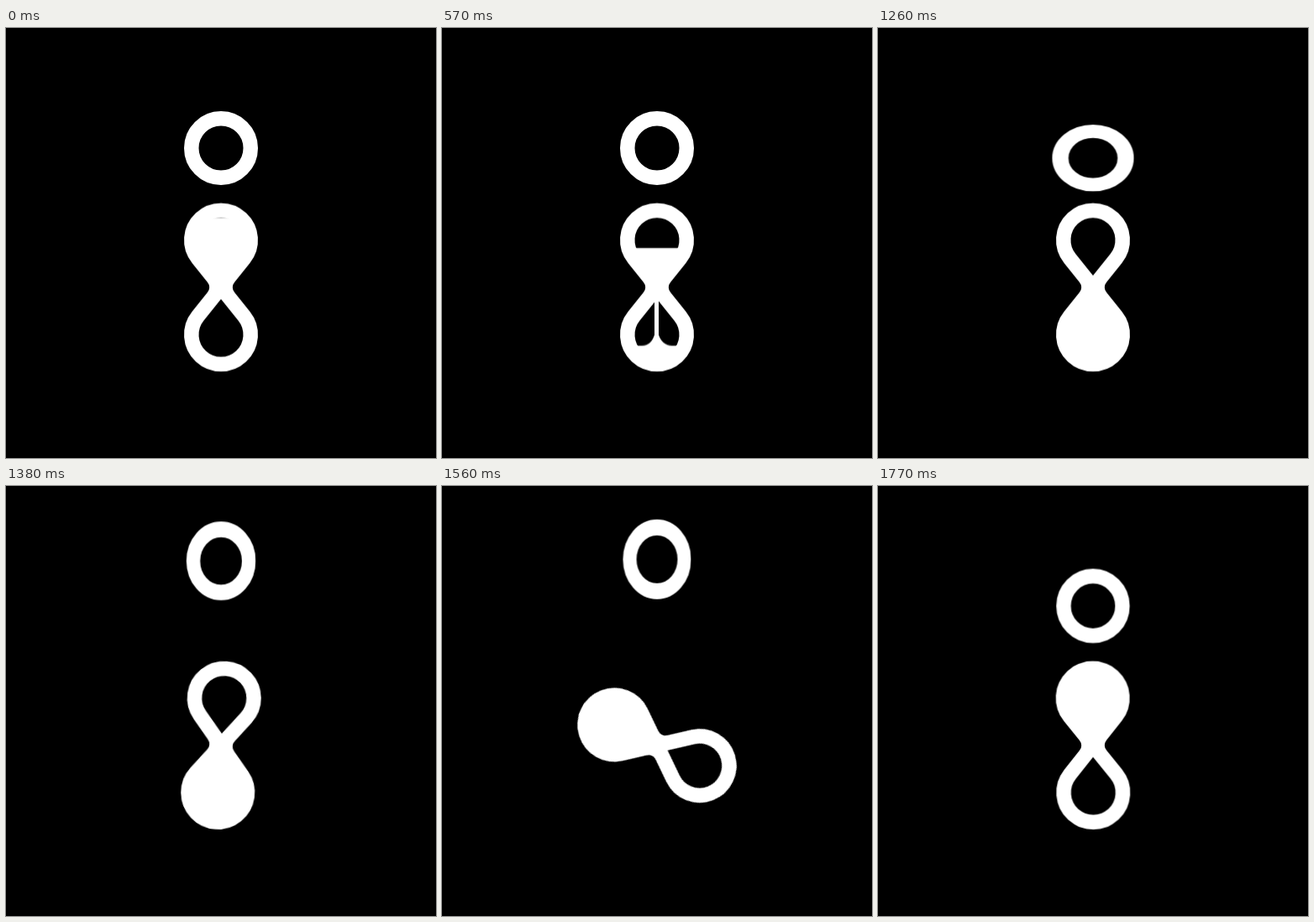
An HTML page without scripts that plays this animation: 512x512 px, repeating every 1.8 s.

```html
<!DOCTYPE html>
<html lang="en">
<head>
<meta charset="utf-8">
<title>Hourglass</title>
<style>
  html, body { margin: 0; width: 100%; height: 100%; overflow: hidden; background: #000; }
  svg { display: block; width: 100vw; height: 100vh; }
  .line { fill: none; stroke: #fff; stroke-width: 17.5; }
  .sand, .neck { fill: #fff; }

  .ring, .glass, .top, .pile, .stream { animation: 1800ms linear infinite; }
  .ring { animation-name: hop; }
  .squash { animation: squash 1800ms ease-in-out infinite; }
  .glass { animation-name: flip; }
  .top { animation-name: drain; }
  .pile { animation-name: rise; }
  .stream { animation-name: pour; }

  /* the upper level sinks at a steady rate */
  @keyframes drain {
    0% { transform: translateY(0); }
    61.11%, 100% { transform: translateY(69.7px); }
  }
  @keyframes pour {
    0% { transform: translateY(-75px); }
    8.33%, 100% { transform: translateY(0); }
  }
  @keyframes rise {
    0%, 10% { transform: translateY(98px); }
    16.67% { transform: translateY(88px); }
    30% { transform: translateY(71.5px); }
    48.33% { transform: translateY(50.25px); }
    60% { transform: translateY(35px); }
    66.67%, 100% { transform: translateY(10px); }
  }
  /* half a turn, then the loop starts over with a full top */
  @keyframes flip {
    0%, 71.667% { transform: rotate(0deg); animation-timing-function: cubic-bezier(.8, 0, .2, 1); }
    100% { transform: rotate(180deg); }
  }
  @keyframes hop {
    0%, 60.5% { transform: translate(256px, 143px); animation-timing-function: ease-in-out; }
    71% { transform: translate(256px, 155px); animation-timing-function: cubic-bezier(.55, 0, .3, 1); }
    80.83% { transform: translate(256px, 71.5px); animation-timing-function: cubic-bezier(.4, 0, .8, .6); }
    83.33% { transform: translate(256px, 76px); }
    85% { transform: translate(256px, 80.5px); }
    86.67% { transform: translate(256px, 87px); }
    88.33% { transform: translate(256px, 96px); }
    90% { transform: translate(256px, 109px); }
    91.67% { transform: translate(256px, 128.5px); animation-timing-function: cubic-bezier(.15, .6, .4, 1); }
    100% { transform: translate(256px, 143px); }
  }
  @keyframes squash {
    0%, 60.5% { transform: scale(1, 1); }
    71% { transform: scale(1.105, .9); }
    78% { transform: scale(.925, 1.078); }
    91.67% { transform: scale(.92, 1.08); }
    100% { transform: scale(1, 1); }
  }
</style>
</head>
<body>
<svg viewBox="0 0 512 512">
  <defs>
    <clipPath id="upper">
      <path d="M0 0L27.47 -34.16A35.25 35.25 0 1 0 -27.47 -34.16Z"/>
    </clipPath>
    <clipPath id="lower">
      <path d="M0 0L27.47 34.16A35.25 35.25 0 1 1 -27.47 34.16Z"/>
    </clipPath>
  </defs>

  <g class="ring">
    <g class="squash"><circle class="line" r="35.25"/></g>
  </g>

  <g transform="translate(256 308.75)">
    <g class="glass">
      <g class="sand" clip-path="url(#upper)">
        <rect class="top" x="-45" y="-82.75" width="90" height="90"/>
      </g>
      <g class="sand" clip-path="url(#lower)">
        <rect class="stream" x="-3" y="8" width="5" height="80"/>
        <path class="pile" d="M-45 0H-18C-10 0 -5 -6 -3 -13H2C4 -6 10 0 18 0H45V90H-45Z"/>
      </g>
      <path class="line" d="M-27.47 -34.16L27.47 34.16A35.25 35.25 0 1 1 -27.47 34.16L27.47 -34.16A35.25 35.25 0 1 0 -27.47 -34.16Z"/>
      <path class="neck" d="M-15.8 -5.64A9 9 0 0 1 -15.8 5.64H15.8A9 9 0 0 1 15.8 -5.64Z"/>
    </g>
  </g>
</svg>
</body>
</html>
```
